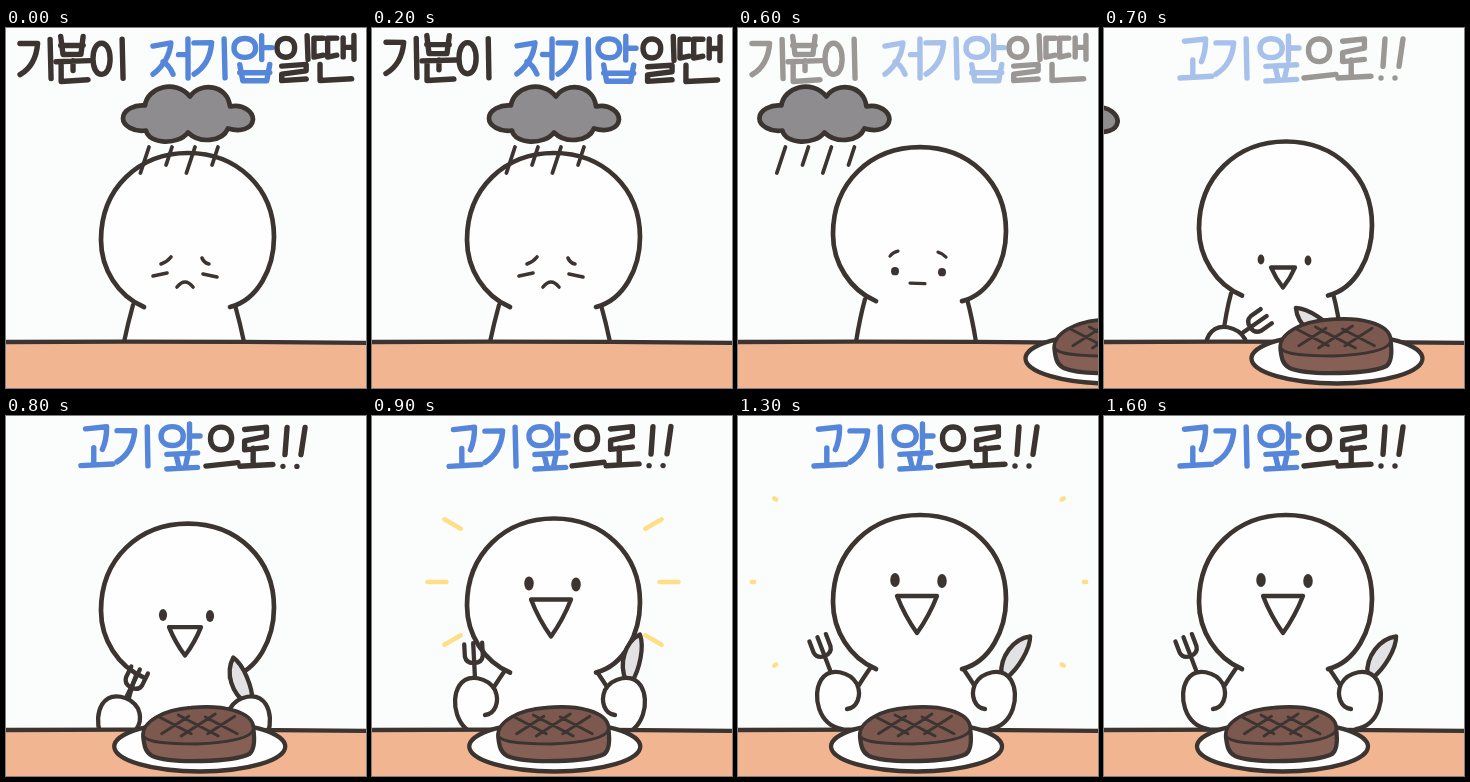
These frames come from a looping animation (360x360 px, 1700 ms). An HTML page:

```html
<!DOCTYPE html>
<html lang="ko">
<head>
<meta charset="utf-8">
<title>기분이 저기압일땐 고기앞으로!!</title>
<style>
  html, body { margin: 0; width: 100%; height: 100%; overflow: hidden; background: #fbfdfc; }
  svg { display: block; width: 100vw; height: 100vh; }
</style>
</head>
<body>
<svg id="stage" viewBox="0 0 360 360" fill="none" stroke="#3b3431" stroke-width="4.3" stroke-linecap="round" stroke-linejoin="round"></svg>
<script>
const STEP = 100, STEPS = 17;
const INK = '#3b3431', BLUE = '#5586d9', WHITE = '#fefefe';
const stage = document.getElementById('stage');

const progress = (k, from, to) => Math.min(1, Math.max(0, (k - from) / (to - from)));
const smooth = u => u * u * (3 - 2 * u);
const mix = (a, b, u) => a + (b - a) * u;
const path = (d, attrs = '') => `<path d="${d}" ${attrs}/>`;
const oval = (x, y, rx, ry, attrs) => `<ellipse cx="${x}" cy="${y}" rx="${rx}" ry="${ry}" ${attrs}/>`;
const group = (transform, content, attrs = '') => `<g transform="${transform}" ${attrs}>${content}</g>`;

// Pen strokes of each letter in a 10 by 10 box; syllables are assembled from them.
const STROKES = {
  'ㄱ': 'M0 0L10 0Q9 7 0 10',
  'ㄱㅗ': 'M0 1L10 0Q10 6 8 10',
  'ㄴ': 'M0 0L0 10L10 9',
  'ㄸ': 'M4 0L0 0L0 10L4 9M10 0L6 0L6 10L10 9',
  'ㄹ': 'M0 1L10 0L10 4L0 6L0 10L10 9',
  'ㅂ': 'M0 0L1 10L9 10L10 0M0 5L10 5',
  'ㅇ': 'M5 0C8 0 10 2 10 5C10 8 8 10 5 10C2 10 0 8 0 5C0 2 2 0 5 0Z',
  'ㅈ': 'M0 1L9 0Q8 6 0 10M5 6Q8 7 10 10',
  'ㅍ': 'M0 1L10 0M3 1L4 9M7 0L6 9M0 10L10 9',
  'ㅏ': 'M0 0L0 10M0 5L10 5',
  'ㅐ': 'M0 1L0 9M10 0L10 10M0 5L10 5',
  'ㅓ': 'M10 0L10 10M0 4L10 4',
  'ㅗ': 'M4 0L4 9M0 10L10 9',
  'ㅜ': 'M0 1L10 0M5 0L5 10',
  'ㅡ': 'M0 10L10 8',
  'ㅣ': 'M9 0L10 10',
  '!': 'M10 0L5 7M0 10L0 10'
};
const INITIALS = 'ㄱㄲㄴㄷㄸㄹㅁㅂㅃㅅㅆㅇㅈㅉㅊㅋㅌㅍㅎ';
const VOWELS = 'ㅏㅐㅑㅒㅓㅔㅕㅖㅗㅘㅙㅚㅛㅜㅝㅞㅟㅠㅡㅢㅣ';
const FINALS = ' ㄱㄲㄳㄴㄵㄶㄷㄹㄺㄻㄼㄽㄾㄿㅀㅁㅂㅄㅅㅆㅇㅈㅊㅋㅌㅍㅎ';

function glyph(char, x, width) {
  const code = char.charCodeAt(0) - 0xAC00;
  const final = code < 0 ? 0 : code % 28;
  const top = final ? 8 : 11, height = final ? 45 : 39;
  const part = (name, left, up, right, down) => STROKES[name].replace(/(\d+) (\d+)/g, (_, u, v) =>
    `${x + width * mix(left, right, u / 10)} ${top + height * mix(up, down, v / 10)}`);
  if (code < 0) return part(char, 0, 0, 1, 1);

  const initial = INITIALS[Math.floor(code / 588)], vowel = VOWELS[Math.floor(code / 28) % 21];
  const first = STROKES[initial + vowel] ? initial + vowel : initial;
  const last = final ? part(FINALS[final], .15, .64, .94, 1) : '';
  if ('ㅗㅜㅡ'.includes(vowel)) {
    return part(first, .14, 0, .8, final ? .4 : .58) + part(vowel, 0, .54, 1, final ? .76 : 1) + last;
  }
  return part(first, 0, final ? .06 : .1, .57, final ? .48 : .9) + part(vowel, .73, 0, 1, final ? .53 : 1) + last;
}

const FIRST = [
  ['기', 14, 31], ['분', 50, 34], ['이', 87, 30], ['저', 147, 35, BLUE], ['기', 188, 31, BLUE],
  ['압', 228, 38, BLUE], ['일', 271, 31], ['땐', 308, 40]
];
const SECOND = [
  ['고', 77, 32, BLUE], ['기', 113, 31, BLUE], ['앞', 157, 39, BLUE], ['으', 200, 32], ['로', 234, 33],
  ['!', 277, 4], ['!', 291, 8]
];
function lettering(line, phase, opacity) {
  const glyphs = line.map(([char, x, width, color = INK]) =>
    path(glyph(char, x - (color === BLUE ? phase : 0), width), `stroke="${color}"`)).join('');
  return group(`rotate(${.2 * (phase - 1)} 180 30)`, glyphs, `stroke-width="5.4" opacity="${opacity}"`);
}

const CLOUD = 'M139 79C141 61 169 52 184 70C194 55 222 58 224 80C238 77 247 86 247 93C246 102 235 106 222 102C216 116 193 117 182 106C172 119 143 118 140 104C128 106 117 99 117 92C117 83 129 78 139 79Z';
function cloud(k, phase) {
  let rain = '';
  for (let i = 0; i < 4; i++) {
    const fall = (i + phase) % 2 ? 18 : 26;
    rain += `M${143 + 23 * i + 8 * (phase % 2)} 119l${-.33 * fall} ${fall}`;
  }
  const away = 20.8 * Math.max(0, k - 4) ** 2.2;
  return group(`translate(${-away})`, path(rain, 'stroke-width="3.8"') +
    path(CLOUD, `fill="#8e8c8e" stroke-width="4.7" transform="translate(0 -1.5) rotate(${phase % 2 * 2} 182 90)"`));
}

// Drawn relative to the top of the head; cheer opens the smile and lifts the eyes.
function face(k, cheer) {
  if (k < 6) return path('M155 111Q161 109 165 104M196 105Q198 110 203 111M147 123L161 120M197 121L211 124M171 134Q179 124 187 134', 'stroke-width="3.6"');
  const eyes = (y, rx, ry) => [157, 204].map((x, i) => oval(x, y + i, rx, ry, `fill="${INK}" stroke="none"`)).join('');
  if (k === 6) return path('M152 109Q155 105 160 104M200 105Q204 106 208 110M172 136L187 136.5', 'stroke-width="3.2"') + eyes(124, 4, 4.2);
  const size = mix(5, 7, cheer), top = mix(126, 81, cheer), half = mix(12, 20, cheer), drop = mix(20, 37, cheer);
  return eyes(mix(118, 65, cheer), size * .68, size) +
    path(`M${179 - half} ${top}H${179 + half}Q${179 + half * .6} ${top + drop * .55} 179 ${top + drop}Q${179 - half * .6} ${top + drop * .55} ${179 - half} ${top}Z`, `fill="${WHITE}"`);
}

function figure(k, cheer) {
  const rise = 26 * smooth(progress(k, 4, 10.5)), neck = 277 - rise;
  const reach = mix(314, neck + 18, cheer), spread = mix(9, 12, cheer);
  const side = (x, dir) => `M${x} ${neck}Q${x + dir * 5} ${mix(neck + 18, neck + 7, cheer)} ${x + dir * spread} ${reach}`;
  return path(`M128 ${neck}L120 314H236L229 ${neck}Z`, `fill="${WHITE}" stroke="none"`) +
    path(side(mix(127, 133, cheer), -1) + side(mix(229, 224, cheer), 1)) +
    group(`translate(0 ${-rise})`,
      path('M138 279C112 268 95 241 95 212C95 160 133 125 182 125C231 125 268 160 268 209C268 240 252 272 224 279', `fill="${WHITE}" stroke-width="4.7"`) +
      group('translate(0 125)', face(k, cheer)));
}

function hands(k, cheer) {
  if (k < 7) return '';
  const swing = 1 - (1 - progress(k, 9, 12)) ** 2, low = 1 - cheer;
  const place = (x, y, turn) => `translate(${x} ${y}) rotate(${turn})`;
  const fork = group(place(103 - 11 * swing + 31 * low, 262 - 8 * swing + 46 * low, -3 - 18 * swing + 58 * low),
    path('M0 0V-35M-9 -34V-22Q-8 -15 0 -15Q8 -15 9 -22V-35'));
  const knife = group(place(256 + 9 * swing - 26 * low, 265 - 5 * swing + 44 * low, 12 + 20 * swing - 67 * low),
    path('M-2 0C-13 -15 -11 -37 2 -48C9 -37 9 -14 4 0Z', 'fill="#e2e2e4"'));
  const hand = group(`translate(${4 * (1 - swing) + 18 * low} ${6 * (1 - swing) + 37 * low})`,
    path('M104 313C80 309 74 279 83 264C92 250 112 256 119 268C124 280 119 292 109 293', `fill="${WHITE}"`));
  return knife + fork + hand + group('translate(356) scale(-1 1)', hand);
}

function steak(k) {
  if (k < 6) return '';
  let grill = '';
  for (let i = -1; i <= 1; i++) {
    const x = 177 + 23 * i, s = 1 - .2 * Math.abs(i);
    grill += `M${x - 17 * s} ${309 + 11 * s}l${34 * s} ${-22 * s}M${x - 20 * s} ${309 - 10 * s}l${40 * s} ${21 * s}`;
  }
  return group(`translate(${194.5 * .28 ** (k - 6)})`,
    oval(178.5, 330.5, 85.5, 25, `fill="${WHITE}"`) +
    path('M122 321C121 306 142 294 170 292C200 289 231 295 232 312C234 326 233 334 228 338C212 346 150 348 131 340C124 336 123 330 122 321Z', 'fill="#865f55"') +
    path('M122 320C121 306 142 294 170 292C200 289 231 295 232 312C233 322 205 327 175 328C150 328 126 327 122 320Z', 'fill="#7d584e" stroke-width="3"') +
    path(grill, 'stroke-width="2.8"'));
}

function sparks(k) {
  if (k < 9 || k > 13) return '';
  const u = progress(k, 9, 13), radius = mix(116, 166, Math.sin(u * Math.PI / 2)), half = mix(9.5, 1.2, u);
  let rays = '';
  for (const side of [0, 180]) {
    for (const tilt of [-30, 0, 30]) {
      const angle = (side + tilt) * Math.PI / 180, c = Math.cos(angle), s = Math.sin(angle);
      rays += `M${181 + (radius - half) * c} ${166 + (radius - half) * s}l${2 * half * c} ${2 * half * s}`;
    }
  }
  return path(rays, 'stroke="#ffdf86" stroke-width="4.4"');
}

const TABLE = '<rect y="314" width="360" height="46" fill="#f1b592" stroke="none"/>' + path('M-4 314Q180 313 364 315');

function draw(k) {
  const phase = k % 3, cheer = smooth(progress(k, 7, 9));
  stage.innerHTML = sparks(k) + figure(k, cheer) + hands(k, cheer) + TABLE + steak(k) +
    (k < 8 ? cloud(k, phase) : '') +
    (k < 7 ? lettering(FIRST, phase, k === 6 ? .5 : 1) : lettering(SECOND, phase, k === 7 ? .5 : 1));
}

let shown = -1;
function tick() {
  const k = Math.floor(performance.now() / STEP) % STEPS;
  if (k !== shown) draw(shown = k);
  requestAnimationFrame(tick);
}
tick();
</script>
</body>
</html>
```
